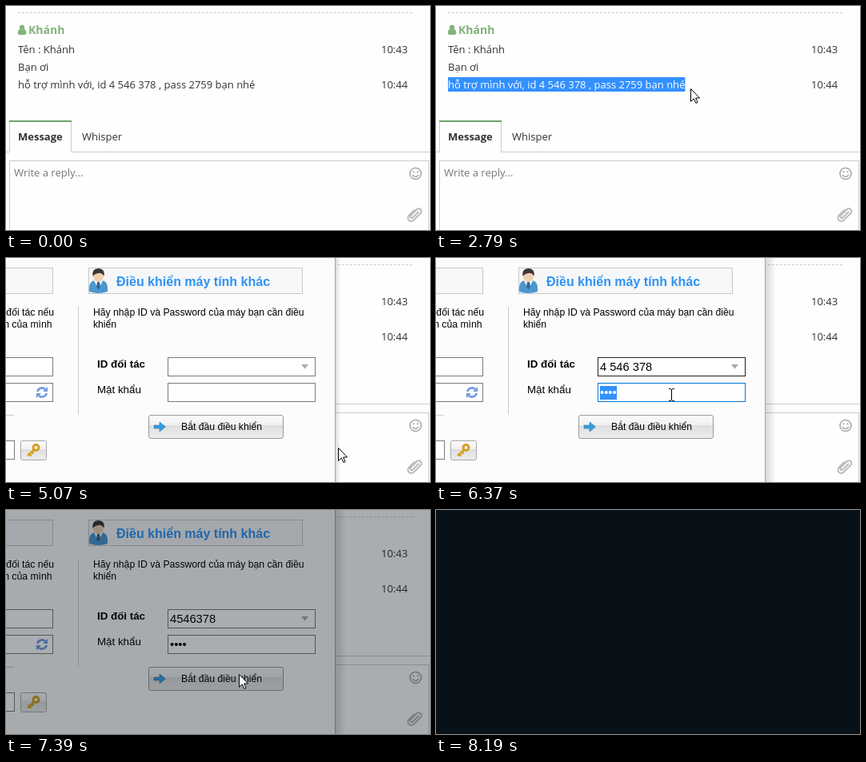
Recreate the animation shown at these times as an HTML page. Size 530 px wide and 280 px high, loop 8530 ms.

```html
<!DOCTYPE html>
<html lang="vi">
<head>
<meta charset="utf-8">
<title>Chat to remote control</title>
<style>
  html, body { margin: 0; width: 100%; height: 100%; overflow: hidden; background: #fefefe; }
  svg { display: block; width: 530px; height: 280px; }
  text { white-space: pre; }
  .chat { font: 13px "Open Sans", sans-serif; fill: #333; }
  .bold { font-weight: 700; }
  .app { font: 12.2px "Liberation Sans", Arial, sans-serif; fill: #000; }
  .label { font-size: 13.33px; }
  .value { font-size: 14.67px; }
  .title { font-size: 16px; font-weight: 700; fill: #2f93f5; }
  .field { fill: #fff; stroke: #7a7a7a; }
  .line { fill: none; stroke: #ccc; }
  .icon { fill: none; stroke: #aaa; stroke-width: 1.6; stroke-linecap: round; }
</style>
</head>
<body>
<svg viewBox="0 0 530 280">
  <defs>
    <linearGradient id="face" x2="0" y2="1">
      <stop offset="0" stop-color="#fafafa"/>
      <stop offset=".42" stop-color="#f1f1f1"/>
      <stop offset=".42" stop-color="#dedede"/>
      <stop offset="1" stop-color="#ececec"/>
    </linearGradient>
    <linearGradient id="shade">
      <stop offset="0" stop-color="#000" stop-opacity=".16"/>
      <stop offset="1" stop-color="#000" stop-opacity="0"/>
    </linearGradient>
    <clipPath id="picked"><rect id="pickedBox" x="15" y="89" width="0" height="18"/></clipPath>
  </defs>

  <rect width="530" height="280" fill="#fefefe"/>
  <g class="chat">
    <path class="line" stroke-dasharray="3 2" d="M15 8.5H508"/>
    <g fill="#7fb377">
      <circle cx="20" cy="26.8" r="3.1"/>
      <path d="M17 28.8Q20 31.6 23 28.8Q25.2 30 25.2 34Q25 36 23 36H17Q15 36 14.8 34Q14.8 30 17 28.8Z"/>
      <text class="bold" x="28" y="35" font-size="14">Khánh</text>
    </g>
    <text x="15" y="59">Tên : Khánh</text>
    <text x="15" y="81">Bạn ơi</text>
    <text x="15" y="103" id="ask">hỗ trợ mình với, id 4 546 378 , pass 2759 bạn nhé</text>
    <g clip-path="url(#picked)">
      <rect x="15" y="89" width="300" height="18" fill="#3390ff"/>
      <text x="15" y="103" id="askPicked" fill="#fff"></text>
    </g>
    <text x="469" y="59">10:43</text>
    <text x="469" y="103">10:44</text>

    <path class="line" stroke="#ddd" d="M0 182.5H4.5V144M81.5 144V182.5H530"/>
    <path d="M4 143H82V145H4Z" fill="#6ea268"/>
    <text class="bold" x="15" y="168">Message</text>
    <text x="95" y="168">Whisper</text>

    <rect class="line" x="4.5" y="193.5" width="524" height="100"/>
    <text x="10" y="213" fill="#777">Write a reply...</text>
    <g class="icon">
      <circle cx="512" cy="209.5" r="7"/>
      <path d="M508.5 211.5Q512 215.5 515.5 211.5"/>
      <path stroke-width="2.2" d="M509.5 207.3h.01M514.5 207.3h.01"/>
      <path stroke="#bbb" stroke-width="2" d="M515.5 257.5l-7 7a1.8 1.8 0 0 1-2.6-2.6l7.6-7.6a3.2 3.2 0 0 1 4.8 4.8l-8.6 8.6a4.2 4.2 0 0 1-6-6l6.6-6.6"/>
    </g>
  </g>

  <g id="win" class="app">
    <rect id="shadow" x="411" width="14" height="280" fill="url(#shade)"/>
    <rect width="411" height="280" fill="#fcfcfc"/>
    <path d="M411.5 0V280" stroke="#a5a5a5"/>
    <g fill="#f6f7f8" stroke="#c8c8c8">
      <rect x="-9.5" y="12.5" width="68" height="32"/>
      <rect x="103.5" y="12.5" width="267" height="32"/>
    </g>
    <path class="line" d="M90.5 61V196M0 196.5H10"/>

    <path d="M104 42Q103 29 111 28H120Q128 29 127 42Q115 46 104 42Z" fill="#4b97cf"/>
    <path d="M110 28L115.5 40L121 28Z" fill="#fff"/>
    <path d="M114 30h3l1 6-2.5 4-2.5-4Z" fill="#2b6695"/>
    <ellipse cx="115.5" cy="22" rx="6.5" ry="8" fill="#f0cfb0"/>
    <path d="M108.5 23Q107 13 115.5 13T122.5 23Q120 18 115 19T108.5 23Z" fill="#3d3430"/>

    <text class="title" x="138" y="35">Điều khiển máy tính khác</text>
    <text x="60" y="72" text-anchor="end">đối tác nếu</text>
    <text x="57.500" y="87" text-anchor="end">n của mình</text>
    <text x="109" y="72">Hãy nhập ID và Password của máy bạn cần điều</text>
    <text x="109" y="87">khiển</text>

    <rect class="field" x="-9.5" y="124.5" width="68" height="23"/>
    <rect class="field" x="-9.5" y="156.5" width="68" height="23"/>
    <g fill="none" stroke="#6f9be0" stroke-width="2.6">
      <path d="M39.500 167a5.500 5 0 0 1 9.500-3M50.500 169a5.500 5 0 0 1-9.500 3"/>
      <path fill="#6f9be0" stroke="none" d="M52 161v6h-6ZM38 175v-6h6Z"/>
    </g>
    <rect class="field" x="-9.5" y="228.5" width="20" height="23"/>
    <rect x="18.500" y="228.500" width="32" height="24" rx="2" fill="url(#face)" stroke="#a8a8a8"/>
    <g fill="none" stroke="#d5a021">
      <circle cx="37.500" cy="237" r="3.500" stroke-width="3"/>
      <path stroke-width="2.500" d="M35 240L27 247M29 245l2.500 2.500M32 242l2.500 2.500"/>
    </g>

    <text class="label bold" x="114" y="137">ID đối tác</text>
    <text class="label" x="114" y="169">Mật khẩu</text>
    <rect class="field" id="idBox" x="202.500" y="124.500" width="184" height="23"/>
    <path d="M369 133H378L373.500 138.500Z" fill="#aaa"/>
    <text class="value" id="idText" x="205" y="141"></text>
    <rect class="field" id="passBox" x="202.500" y="156.500" width="184" height="23"/>
    <rect id="passPick" x="205" y="160" width="21" height="17" fill="#3390ff"/>
    <text class="value" id="passText" x="205" y="173"></text>

    <rect x="178.500" y="196.500" width="168" height="29" rx="2.500" fill="url(#face)" stroke="#9a9a9a"/>
    <path d="M185 209H192V205L199.500 211L192 217V213H185Z" fill="#3a9bd9" stroke="#2b7fb8" stroke-width=".6"/>
    <text x="219" y="215">Bắt đầu điều khiển</text>
  </g>

  <rect id="dark" width="530" height="280" fill="#081118"/>
  <g id="cursor">
    <path id="arrow" fill="#fff" stroke="#000" d="M.5.5V16.500L4.300 12.900 6.900 18.500 9.100 17.500 6.600 12H11.500Z"/>
    <path id="beam" fill="none" stroke="#000" d="M-3-7.500H-1L.5-6.500 2-7.500H4M-3 7.500H-1L.5 6.500 2 7.500H4M.5-7V7"/>
  </g>
</svg>
<script>
const LOOP = 8530;
const $ = id => document.getElementById(id);
const show = (id, on) => { $(id).style.display = on ? '' : 'none'; };

// Pointer moves: start, end, number of steps, x, y, shape
const moves = [
  [240, 480, 3, 13, 100, 'arrow'],
  [730, 840, 2, 21, 102, 'beam'],
  [1330, 1330, 1, 31, 102, 'beam'],
  [1460, 2180, 7, 312, 104, 'beam'],
  [2300, 2300, 1, 321, 103, 'arrow'],
  [2790, 2790, 1, 318, 103, 'arrow'],
  [2910, 3030, 2, 304, 93, 'arrow'],
  [3150, 3270, 2, 305, 100, 'arrow'],
  [3520, 3760, 3, 317, 107, 'arrow'],
  [4000, 4120, 2, 324, 109, 'arrow'],
  [4370, 4730, 4, 415, 237, 'arrow'],
  [5430, 5550, 2, 383, 190, 'arrow'],
  [5670, 5790, 2, 352, 142, 'beam'],
  [6130, 6370, 3, 294, 171, 'beam'],
  [6470, 6590, 2, 293, 180, 'beam'],
  [6710, 6940, 3, 291, 205, 'arrow'],
  [7950, 8070, 2, 394, 246, 'arrow'],
  [8190, 8190, 1, 394, 246, '']
];

function pointer(t) {
  let p = { x: 4, y: 75, shape: '' };
  for (const [start, end, n, x, y, shape] of moves) {
    if (t < start) break;
    const gone = n > 1 ? Math.floor((t - start) / (end - start) * (n - 1) + 1e-6) + 1 : 1;
    const k = Math.min(n, gone) / n;
    p = { x: p.x + (x - p.x) * k, y: p.y + (y - p.y) * k, shape };
  }
  return p;
}

const ask = $('ask'), askLength = ask.textContent.length;
$('askPicked').textContent = ask.textContent;
for (const el of document.querySelectorAll('[fill]')) {
  if (el.tagName === 'text') el.style.fill = el.getAttribute('fill');
}
document.querySelector('.chat g text').style.fill = '#7fb377';

function pickedWidth(t, x) {
  if (t < 1330) return 0;
  const part = t < 2180 ? (x - 31) / 281 : 1;
  return ask.getSubStringLength(0, 1 + Math.round(part * (askLength - 1)));
}

function draw(t) {
  const p = pointer(t);
  $('cursor').setAttribute('transform', `translate(${Math.round(p.x)} ${Math.round(p.y)})`);
  show('arrow', p.shape === 'arrow');
  show('beam', p.shape === 'beam');
  $('pickedBox').setAttribute('width', pickedWidth(t, p.x));

  const filled = t >= 5430, clicked = t >= 7150, focus = filled && !clicked;
  show('win', t >= 5070);
  $('shadow').setAttribute('width', filled ? 14 : 7);
  $('idText').textContent = clicked ? '4546378' : filled ? '4 546 378' : '';
  $('passText').textContent = filled ? '••••' : '';
  $('passText').style.fill = focus ? '#fff' : '#000';
  $('idBox').style.stroke = focus ? '#222' : '#7a7a7a';
  $('passBox').style.stroke = focus ? '#0078d7' : '#7a7a7a';
  show('passPick', focus);
  $('dark').setAttribute('opacity', t < 7390 ? 0 : t < 7490 ? .34 : t < 7610 ? .75 : 1);
}

const begin = performance.now();
function tick() {
  draw((performance.now() - begin) % LOOP);
  requestAnimationFrame(tick);
}
tick();
</script>
</body>
</html>
```
